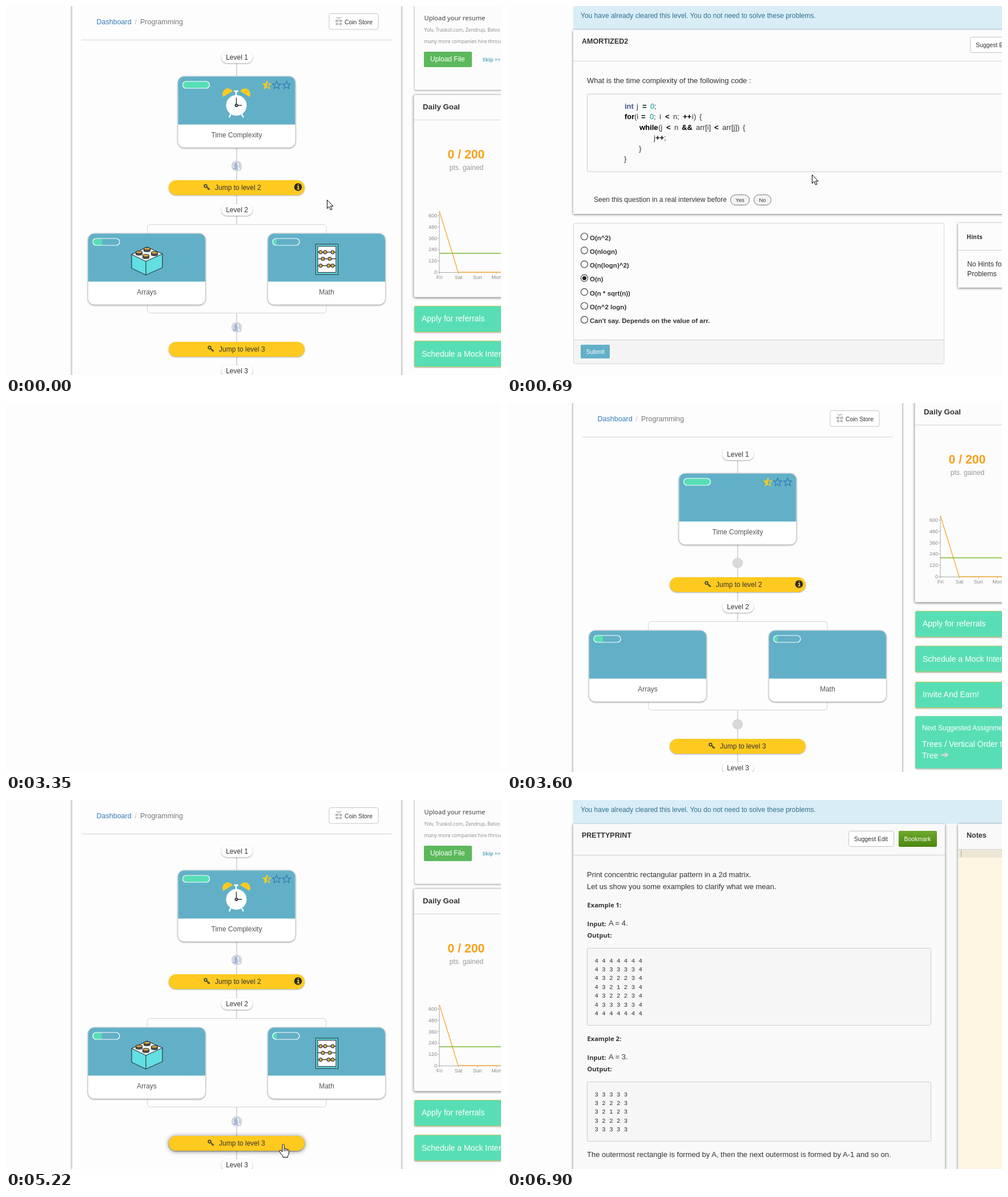
Animation, 867 px wide and 646 px high, one loop 8000 ms. Source, as an HTML page:

```html
<!DOCTYPE html>
<html lang="en">
<head>
<meta charset="utf-8">
<title>Practice dashboard</title>
<style>
html, body { margin: 0; width: 100%; height: 100%; overflow: hidden; background: #fdfdfd; }
svg { display: block; }
text { font: 12px "Liberation Sans", Arial, sans-serif; fill: #333; white-space: pre; }
.mid { text-anchor: middle; }
.end { text-anchor: end; }
.bold { font-weight: bold; }
.title { font-size: 12.5px; font-weight: bold; }
.small { font-size: 10.4px; }
.tiny { font-size: 9px; fill: #888; }
.body { font-size: 13px; }
.big { font-size: 14px; }
.hum { font-family: "Open Sans", "Noto Sans", sans-serif; }
.fine { font-size: 8.6px; fill: #888; }
.mono { font: 10.7px "Liberation Mono", monospace; }
.white { fill: #fff; }
.link { fill: #337ab7; }
.line { fill: none; stroke: #d3d3d3; }
.wire { fill: none; stroke: #ccc; stroke-width: 1.5; }
.box { fill: #fcfcfc; stroke: #d8d8d8; }
.button { fill: #fff; stroke: #c4c4c4; }
.blue { fill: #62b0c7; }
.mint { fill: #58deb5; }
.gold { fill: #ffca1f; }
.ink { fill: none; stroke: #30383d; stroke-width: 1.5; }
.raised { filter: drop-shadow(0 1px 1px rgba(0,0,0,.35)); }
.panel { filter: drop-shadow(0 1px 2px rgba(0,0,0,.55)); }
.hover { filter: drop-shadow(0 1px 4px rgba(0,0,0,.5)); }

.timed { animation: 8s step-end infinite; }
#dash { animation-name: dash; }
#quiz { animation-name: quiz; }
#print { animation-name: print; }
.art { animation-name: art; }
#upload { animation-name: upload; }
#side { animation-name: side; }
#chart { animation-name: chart; }
#similar { animation-name: similar; }
#snippet { animation-name: snippet; }
#glow { animation-name: glow; }
#arrow { animation-name: arrow; }
#hand { animation-name: hand; }

@keyframes dash { 0%, 45% { opacity: 1 } 5.375%, 82.75%, 100% { opacity: 0 } }
@keyframes quiz { 0%, 41.875%, 100% { opacity: 0 } 7.125% { opacity: 1 } }
@keyframes print { 0% { opacity: 0 } 86.25%, 100% { opacity: 1 } }
@keyframes art { 0%, 46.75%, 100% { opacity: 1 } 41.875% { opacity: 0 } }
@keyframes upload { 0%, 48.375%, 100% { opacity: 1 } 41.875% { opacity: 0 } }
@keyframes side { 0%, 48.375%, 100% { transform: none } 41.875% { transform: translateY(-161px) } }
@keyframes chart { 0% { transform: translateY(1px) } 41.875%, 100% { transform: none } }
@keyframes similar { 0% { opacity: 0 } 22.5%, 100% { opacity: 1 } }
@keyframes snippet { 0% { fill: #fafafa } 22.5%, 100% { fill: #f5f5f5 } }
@keyframes glow { 0%, 67.125%, 72.75%, 100% { opacity: 0 } 58.625%, 70.875% { opacity: 1 } }
@keyframes arrow {
  0% { transform: translate(562px, 339px) }
  1.875% { transform: translate(562px, 334px) }
  3.5% { transform: translate(562px, 330px) }
  5.375% { transform: translate(548px, 312px) }
  7.125% { transform: translate(534px, 295px) }
  10.5% { transform: translate(504px, 272px) }
  12% { transform: translate(573px, 215px) }
  13.5% { transform: translate(567px, 166px) }
  15.375% { transform: translate(305px, 6px) }
  17.25% { transform: translate(472px, 43px) }
  19.125% { transform: translate(561px, 34px) }
  20.625%, 58.625%, 79.25%, 100% { transform: translate(-50px, -50px) }
  55.25% { transform: translate(524px, 641px) }
  57.125% { transform: translate(513px, 622px) }
  67.125% { transform: translate(555px, 640px) }
  69% { transform: translate(481px, 636px) }
  70.875% { transform: translate(420px, 555px) }
  72.75% { transform: translate(285px, 440px) }
  74.25% { transform: translate(150px, 329px) }
  76.125% { transform: translate(117px, 329px) }
}
@keyframes hand {
  0%, 67.125%, 100% { transform: translate(-50px, -50px) }
  58.625% { transform: translate(477px, 602px) }
  65.25% { transform: translate(478px, 602px) }
}
</style>
</head>
<body>
<svg width="867" height="646" viewBox="0 0 867 646">
  <defs>
    <linearGradient id="leaf" x2="0" y2="1"><stop stop-color="#6fa92c"/><stop offset="1" stop-color="#4a860f"/></linearGradient>
    <path id="star" d="M0-7L2-2.3L7-2L3.2 1.3L4.4 6.2L0 3.5L-4.4 6.2L-3.2 1.3L-7-2L-2-2.3Z"/>
    <g id="key" class="ink"><circle cx="-2.5" cy="-2" r="2.4"/><path d="M-.7-.4L5 4M2 2L.6 3.6M4 3.3L2.8 5"/></g>
    <g id="banner">
      <rect x="116" width="760" height="41" fill="#d9edf7"/>
      <path d="M116 40.5H867" stroke="#c6e6f0"/>
      <text x="129" y="21" style="fill:#31708f">You have already cleared this level. You do not need to solve these problems.</text>
    </g>
  </defs>

  <g id="dash" class="timed">
    <rect class="panel" x="116" y="-20" width="576" height="690" fill="#fdfdfd"/>
    <text x="158.5" y="32" class="link" style="font-size:12.5px">Dashboard</text>
    <text x="225.5" y="32" style="fill:#bbb">/</text>
    <text x="235" y="32" style="font-size:12.5px;fill:#777">Programming</text>
    <rect class="button" x="566" y="13.5" width="86" height="27.5" rx="3"/>
    <g fill="#bbb"><path d="M577 24h5v4h-5zm6.5 0h5v4h-5zm-6 5.5h4.5v4h-4.5zm6 0h4.5v4h-4.5z"/>
      <path d="M578 20.5q4-1 4.7 2.5q1-3.5 5-2.5" fill="none" stroke="#bbb" stroke-width="1.5"/></g>
    <text x="593" y="32" class="small">Coin Store</text>
    <path class="line" d="M132 59.5H676"/>
    <path class="wire" d="M404 100V123M404 248V383M404 537V630"/>
    <path class="line" d="M247.5 398V388.5Q247.5 382.5 253.5 382.5H555Q561 382.5 561 388.5V398M247.5 523V531.5Q247.5 537.5 253.5 537.5H555Q561 537.5 561 531.5V523"/>
    <g id="map"></g>
    <g fill="none" stroke="#3479b8" stroke-width="1.3">
      <use href="#star" x="457" y="138.5" stroke="#ffca1f"/>
      <path class="gold" d="M457 131.5L455 136.2L450 136.5L453.8 139.8L452.6 144.7L457 142Z" stroke="none"/>
      <use href="#star" x="474" y="138.5"/>
      <use href="#star" x="491.5" y="138.5"/>
    </g>
    <circle cx="511.5" cy="317" r="6.8" fill="#2b2b20"/>
    <path d="M510 315.8h2.3v4.6m-2.6 0h4.2M511 313h1.8" fill="none" stroke="#ffca1f" stroke-width="1.7"/>

    <g class="art timed">
      <path d="M394 188L391 195M412 188L416 195M403 150V157M399.5 149H407" stroke="#fff" stroke-width="2.5"/>
      <path class="gold" d="M380.5 159A9.6 9.6 0 0 1 397 149ZM426.5 159A9.6 9.6 0 0 0 410 149Z"/>
      <circle cx="403.5" cy="174" r="18" fill="#fff"/>
      <path class="ink" d="M403.5 160.5V174H413"/>
      <circle cx="403.5" cy="174" r="3" fill="#30383d"/><circle cx="403.5" cy="174" r="1" fill="#fff"/>
    </g>
    <g class="art timed" stroke="#30444c" stroke-width="1.3" stroke-linejoin="round">
      <path d="M220 435L247 422L274 434V458L245 471L220 459Z" fill="#62dfe2"/>
      <path d="M220 435L247 422L274 434L245 447Z" fill="#f4f8f8"/>
      <path d="M245 447V471"/>
      <g id="studs"></g>
    </g>
    <g class="art timed" stroke="#30444c" stroke-width="1.3">
      <rect x="542.5" y="417" width="39" height="53" fill="#62dfe2"/>
      <rect x="546" y="420.5" width="32" height="46" fill="#fff"/>
      <path d="M546 431H578M546 442.5H578M546 454.5H578"/>
      <g id="beads" fill="#f0a93a"></g>
    </g>

    <g id="upload" class="timed">
      <rect class="box raised" x="715.5" y="-10" width="180" height="157" rx="2"/>
      <text x="732.5" y="25" class="hum" style="font-size:11.2px">Upload your resume</text>
      <text x="732.5" y="45" class="hum fine">Yolv, Traskol.com, Zendrup, Belvo</text>
      <text x="732.5" y="65" class="hum fine">many more companies hire through</text>
      <rect x="732" y="80" width="84" height="27" rx="2" fill="#5cb85c"/>
      <text x="743" y="97" class="white">Upload File</text>
      <text x="834.5" y="97" class="hum bold" style="font-size:9px;fill:#62a9bf">Skip &gt;&gt;</text>
    </g>
    <g id="side" class="timed">
      <rect class="box panel" x="714.5" y="155.5" width="180" height="354" rx="2"/>
      <text x="730" y="181" class="bold" style="font-size:13.3px">Daily Goal</text>
      <path class="line" d="M715 199.5H867"/>
      <text x="806" y="267" class="mid bold" style="font-size:21.2px;fill:#f9a11b">0 / 200</text>
      <text x="806.5" y="287" class="mid" style="font-size:12.2px;fill:#999">pts. gained</text>
      <g id="chart" class="timed"></g>
      <g id="offers"></g>
      <path d="M760 775.5h7v-3.5l7 5l-7 5v-3.5h-7z" fill="#cfd8d2"/>
    </g>
  </g>

  <g id="quiz" class="timed">
    <use href="#banner"/>
    <rect class="panel" x="116" y="42" width="780" height="322" fill="#fcfcfc"/>
    <text x="131" y="66" class="title">AMORTIZED2</text>
    <rect class="button" x="811.5" y="54.5" width="79" height="27" rx="3"/>
    <text x="821" y="72" class="small">Suggest Edit</text>
    <path class="line" d="M116 96.5H867"/>
    <text x="140" y="135" class="body">What is the time complexity of the following code :</text>
    <rect id="snippet" class="timed" x="140.5" y="154" width="760" height="136" rx="2" stroke="#ccc"/>
    <g id="code"></g>
    <text x="152" y="343">Seen this question in a real interview before</text>
    <g fill="#f3f3f3" stroke="#777"><rect x="391.5" y="330.5" width="33" height="18" rx="9"/><rect x="432.5" y="330.5" width="30" height="18" rx="9"/></g>
    <text x="408" y="343" class="mid" style="font-size:9.4px">Yes</text>
    <text x="447.5" y="343" class="mid" style="font-size:9.4px">No</text>
    <rect class="box" x="116.5" y="380.5" width="649" height="246" rx="2"/>
    <path d="M117 584.5H765V626H117Z" fill="#f4f4f4"/>
    <path class="line" d="M117 584.5H766"/>
    <g id="options"></g>
    <rect class="blue" x="129" y="593" width="51" height="24" rx="2"/>
    <text x="154.7" y="609" class="mid white small">Submit</text>
    <rect class="panel" x="790" y="380" width="100" height="113" fill="#fcfcfc"/>
    <text x="805" y="408" class="hum bold" style="font-size:10.4px">Hints</text>
    <path class="line" d="M790 427.5H867"/>
    <text x="806" y="456" style="font-size:12.2px">No Hints for</text>
    <text x="806" y="473" style="font-size:12.2px">Problems</text>
    <g id="similar" class="timed">
      <rect class="box" x="790.5" y="526.5" width="100" height="110"/>
      <path class="line" d="M791 569.5H867M791 603.5H867"/>
      <text x="807" y="552" class="title">Similar Problems</text>
      <text x="803" y="590" class="link">NESTED_CODE</text>
      <text x="803" y="624" class="link">NESTED_CODE</text>
    </g>
  </g>

  <g id="print" class="timed">
    <rect x="113" width="760" height="646" fill="#f8f8f8"/>
    <rect class="panel" x="116" y="42" width="651" height="640" fill="#f9f9f9"/>
    <use href="#banner"/>
    <text x="131" y="66" class="title">PRETTYPRINT</text>
    <rect class="button" x="598.5" y="54.5" width="79" height="27" rx="3"/>
    <text x="637.5" y="72" class="mid small">Suggest Edit</text>
    <rect x="686" y="54" width="67" height="28" rx="2" fill="url(#leaf)"/>
    <text x="719" y="72" class="mid white small">Bookmark</text>
    <path class="line" d="M116 96.5H767"/>
    <text x="140" y="135" class="body">Print concentric rectangular pattern in a 2d matrix.</text>
    <text x="140" y="156" class="body">Let us show you some examples to clarify what we mean.</text>
    <g id="examples"></g>
    <text x="140" y="625" class="body">The outermost rectangle is formed by A, then the next outermost is formed by A-1 and so on.</text>
    <rect class="panel" x="790" y="42" width="100" height="640" fill="#f9f9f9"/>
    <text x="805" y="66" class="title">Notes</text>
    <rect x="791" y="86" width="80" height="560" fill="#fdf4e1"/>
    <rect x="791" y="87" width="80" height="13.5" fill="#ece6d5"/>
    <path class="line" d="M790 86.5H867"/>
    <path d="M795.5 88V100" stroke="#b5a98a"/>
  </g>

  <path id="arrow" class="timed" d="M.5.5V15.5L4 12.2L6.5 18L9 17L6.5 11.5H11Z" fill="#fff" stroke="#000"/>
  <path id="hand" class="timed" d="M6 14V2.5Q6 .5 7.5 .5T9.2 2.5V8.5Q10.5 7 12 9Q13.5 8 14.8 10Q17.5 9 17.5 12.5V17Q17 20 15.5 21V23.5H7V21Q3 17 1 13.5Q.5 11 2.5 11Q4 11.5 6 14ZM9.2 8.5V13M12 9V13M14.8 10V13" fill="#fff" stroke="#000"/>
</svg>
<script>
const fill = (id, parts) => { document.getElementById(id).innerHTML = parts.join(''); };
const label = (x, y, text, cls = '', style = '') =>
  `<text x="${x}" y="${y}" class="${cls}" style="${style}">${text}</text>`;

// Dashboard
const pill = (y, n) =>
  `<rect class="raised" x="377" y="${y - 10}" width="55" height="20" rx="10" fill="#fff"/>` +
  label(404.5, y + 4, `Level ${n}`, 'mid');

const card = (x, y, name, progress) => `<g transform="translate(${x} ${y})">
  <rect class="raised" width="206" height="125" rx="11" fill="#fff" stroke="#ccc"/>
  <path class="blue" d="M.5 84.5V11A10.5 10.5 0 0 1 11 .5H195A10.5 10.5 0 0 1 205.5 11V84.5Z"/>
  <clipPath id="bar${name[0]}"><rect x="8.5" y="9" width="47" height="12" rx="6"/></clipPath>
  <rect class="mint" x="8.5" y="9" width="${progress}" height="12" clip-path="url(#bar${name[0]})"/>
  <rect x="8.5" y="9" width="47" height="12" rx="6" fill="none" stroke="#fff" stroke-width="1.2"/>
  ${label(103, 107, name, 'mid', 'fill:#555')}</g>`;

const jump = (y, n, keyX) => {
  const bar = (attrs) => `<rect ${attrs} x="285" y="${y}" width="238" height="26" rx="13"/>`;
  return bar('class="gold raised"') + (n > 2 ? bar('id="glow" class="gold hover timed"') : '') +
    `<use href="#key" x="${keyX}" y="${y + 12}"/>` + label(keyX + 14, y + 17, `Jump to level ${n}`);
};

const avatar = (y) => `<circle cx="404" cy="${y}" r="9.3" fill="#d9d9d9"/>
  <g class="art timed"><circle cx="404" cy="${y}" r="9.3" fill="#d4d8e0"/>
  <path d="M397 ${y + 6}q1-3 4-3q-3-8 2-9q5 1 2 9q3 0 4 3z" fill="#a3b6dc"/>
  <path d="M404 ${y - 6}q6 0 4 7l1 3q3 0 3 3h-5q-2-2-1-6z" fill="#fff" stroke="#aab4c4" stroke-width=".8"/></g>`;

fill('map', [
  pill(90, 1), pill(357, 2), pill(639, 3),
  card(301, 123, 'Time Complexity', 47), card(143.5, 398, 'Arrays', 16), card(458.5, 398, 'Math', 7),
  avatar(280), avatar(562.5), jump(305, 2, 352), jump(588, 3, 359)
]);
fill('studs', [[247, 425], [233, 431], [260, 432], [245, 437]].map(([x, y]) =>
  `<path d="M${x - 5.5} ${y}v3a5.5 2.2 0 0 0 11 0v-3z" fill="#5a4a35"/>` +
  `<ellipse cx="${x}" cy="${y}" rx="5.5" ry="2.2" fill="#f0a93a"/>`));
fill('beads', [[431, 551, 559, 572], [442.5, 555, 567], [454.5, 551, 565, 572]].flatMap(([y, ...xs]) =>
  xs.map(x => `<circle cx="${x}" cy="${y}" r="2.9"/>`)));

fill('chart', [
  '<path d="M759 360V465.5H867" fill="none" stroke="#aaa"/>',
  ...[600, 480, 360, 240, 120, 0].map((n, i) => {
    const y = 366 + i * 19.8;
    return label(755, y + 3, n, 'tiny end') + `<path d="M756 ${y}h3" stroke="#aaa"/>`;
  }),
  ...['Fri', 'Sat', 'Sun', 'Mon'].map((day, i) =>
    label(759 + i * 33.4, 477, day, 'tiny mid') + `<path d="M${759 + i * 33.4} 465v3" stroke="#aaa"/>`),
  '<path d="M759 358L792 465H867" fill="none" stroke="#fbb040" stroke-width="1.5"/>',
  '<path d="M759 432H867" stroke="#7cb82f" stroke-width="1.5"/>'
]);

const offer = (y, h, edge) =>
  `<rect class="mint raised" x="715.5" y="${y + .5}" width="180" height="${h}" rx="2" stroke="${edge}"/>`;
fill('offers', [
  offer(525, 45, '#b3cb62'), offer(586, 45, '#b3cb62'), offer(649, 45, '#c6c94e'), offer(709, 91, '#7fdcab'),
  label(728, 552, 'Apply for referrals', 'big white'),
  label(728, 614, 'Schedule a Mock Interview', 'big white'),
  label(728, 676, 'Invite And Earn!', 'big white'),
  label(727, 734, 'Next Suggested Assignment', 'white'),
  label(727, 763, 'Trees / Vertical Order traversal', 'big white'),
  label(727, 783, 'Tree', 'big white')
]);

// Quiz: each token is [x, text, optional style]
const strong = 'font-weight:bold;fill:#000', keyword = 'font-weight:bold;fill:#458', number = 'fill:#099';
const code = [
  [[206, 'int', keyword], [227, 'j'], [237, '=', strong], [251, '0', number], [258, ';']],
  [[206, 'for', strong], [223, '(i'], [235, '=', strong], [250, '0', number], [257, ';'], [267, 'i'],
    [277, '&lt;', strong], [291, 'n;'], [308, '++', strong], [324, 'i)'], [337, '{']],
  [[232, 'while', strong], [265, '(j'], [279, '&lt;', strong], [293, 'n'], [306, '&amp;&amp;', strong],
    [331, 'arr[i]'], [363, '&lt;', strong], [377, 'arr[j])'], [413, '{']],
  [[257, 'j'], [260, '++', strong], [275, ';']],
  [[231, '}']],
  [[205, '}']]
];
fill('code', code.flatMap((row, i) =>
  row.map(([x, text, style]) => label(x, Math.round(180 + i * 18.4), text, 'body', style))));

const answers = ['O(n^2)', 'O(nlogn)', 'O(n(logn)^2)', 'O(n)', 'O(n * sqrt(n))', 'O(n^2 logn)',
  "Can't say. Depends on the value of arr."];
fill('options', answers.map((text, i) => {
  const y = 403.5 + i * 24.3;
  return `<circle cx="135.5" cy="${y}" r="6" fill="#fff" stroke="#444" stroke-width="1.2"/>` +
    (i === 3 ? `<circle cx="135.5" cy="${y}" r="3.5" fill="#222"/>` : '') +
    label(145, Math.round(y + 6), text, 'bold', 'font-size:11.5px');
}));

// Concentric squares
const example = (n, size, y, boxY, boxH) => {
  const heading = (dy, text) => label(140.5, y + dy, text, 'hum bold', 'font-size:11.1px');
  const span = Array.from({ length: size * 2 - 1 }, (_, i) => Math.abs(i - size + 1));
  return heading(0, `Example ${n}:`) + heading(33, 'Input:') + heading(53, 'Output:') +
    label(178, y + 32, `A = ${size}.`, 'body') +
    `<rect x="140.5" y="${boxY}" width="602" height="${boxH}" rx="2" fill="#f6f6f6" stroke="#ccc"/>` +
    span.map((r, i) => label(153.5, Math.round(boxY + 25 + i * 15.45),
      span.map(c => Math.max(r, c) + 1).join(' '), 'mono')).join('');
};
fill('examples', [example(1, 4, 188, 259.5, 135), example(2, 3, 422, 493.5, 104)]);
</script>
</body>
</html>
```
